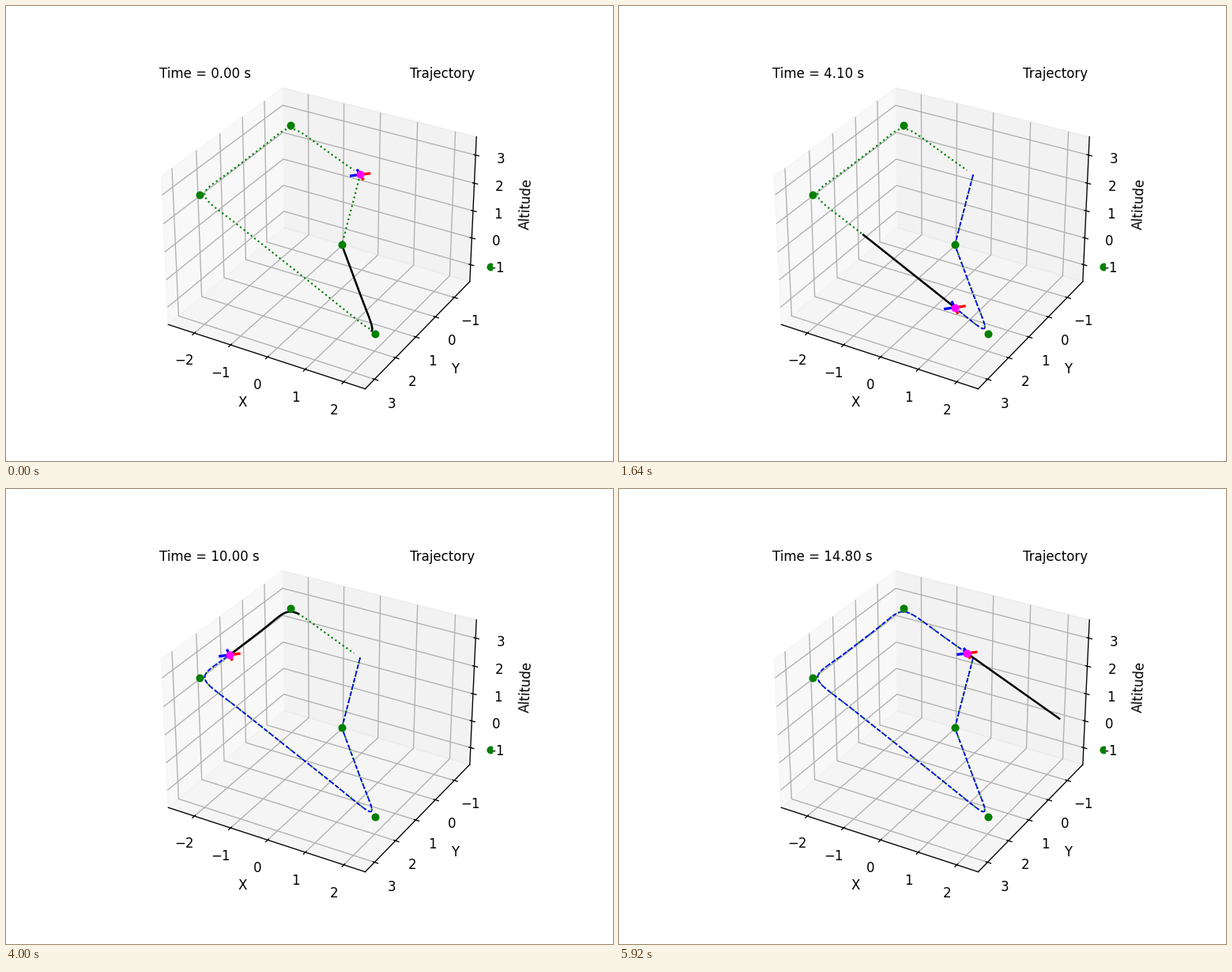
Animation of 768 by 576 pixels, one loop 5.96 s. Source, as a matplotlib script:

```python
import numpy as np
import matplotlib.pyplot as plt
from matplotlib.animation import FuncAnimation

FRAMES, DT, HORIZON = 149, 0.1, 3.0
STIFF = 2.8          # how tightly corners are followed
ARM = 0.16
GRAVITY = 9.81

waypoints = np.array([[0, 0, 0], [2, 2, -1], [-2, 3, 3],
                      [-2, -1, 3], [3, -2, -1]], float)
legs = np.diff(waypoints, axis=0)
lengths = np.linalg.norm(legs, axis=1)
dirs = legs / lengths[:, None]
corners = np.cumsum(lengths)[:-1]
turns = np.diff(dirs, axis=0)


def path(t, end=np.inf):
    """Position at unit speed with rounded corners; turns after `end` are unseen."""
    t = np.atleast_1d(t).astype(float)
    s = t - t * np.exp(-t**1.5)          # start from rest, then catch up
    p = waypoints[0] + s[:, None] * dirs[0]
    for tc, dv in zip(corners, turns):
        x = STIFF * np.abs(s - tc)
        bend = np.maximum(s - tc, 0) + np.exp(-x) * (np.cos(x) - np.sin(x)) / (4 * STIFF)
        seen = 1 - np.exp(-max(end - tc, 0) / 0.08)
        p = p + seen * bend[:, None] * dv
    return p


def acceleration(t, h=0.05):
    a, b, c = path([max(t - h, 0), t, t + h])
    return (a - 2 * b + c) / h**2


def arm_points(pos, acc):
    d = ARM * np.array([[1, -1], [0, 0], [1, 1], [-1, 1], [0, 0], [-1, -1]])
    z = -d @ acc[:2] / GRAVITY
    return pos + np.column_stack([d, z])


# The first sample holds the final position, so the track closes on itself.
times = np.arange(FRAMES) * DT
times[0] = FRAMES * DT + DT
track = path(times)

fig = plt.figure(figsize=(6.4, 4.8), dpi=120)
ax = fig.add_subplot(projection='3d')

half, mid = 2.64, (-0.093, 0.795, 1.0)
ax.set_xlim3d(mid[0] - half, mid[0] + half)
ax.set_ylim3d(mid[1] + half, mid[1] - half)
ax.set_zlim3d(mid[2] - half, mid[2] + half)
ax.set_xlabel('X')
ax.set_ylabel('Y')
ax.set_zlabel('Altitude')

clock = ax.text2D(0.05, 0.95, '', transform=ax.transAxes)
ax.text2D(0.95, 0.95, 'Trajectory', transform=ax.transAxes, ha='right')

ax.scatter(*waypoints.T, color='green', alpha=1, marker='o', s=25, depthshade=False)
ax.plot(*track.T, ':', lw=1.3, color='green')


def line(style='-', **kw):
    return ax.plot([], [], [], style, **kw)[0]


trail = line('--', lw=1, color='blue')
ahead = line(lw=1.5, color='black')
front = line(lw=2, color='red')
rear = line(lw=2, color='blue')
body = line('o', ms=5, color='magenta')


def update(i):
    pos = track[i]
    start = max(i, 1) * DT
    end = start + HORIZON
    arms = arm_points(pos, acceleration(times[i]))
    trail.set_data_3d(*track[:i].T)
    ahead.set_data_3d(*path(np.linspace(start, end, 31), end).T)
    front.set_data_3d(*arms[:3].T)
    rear.set_data_3d(*arms[3:].T)
    body.set_data_3d(*pos[:, None])
    clock.set_text(f'Time = {i * DT:.2f} s')
    return trail, ahead, front, rear, body, clock


anim = FuncAnimation(fig, update, frames=FRAMES, interval=40,
                     init_func=lambda: update(0), repeat=True, repeat_delay=0)
plt.show()
```
